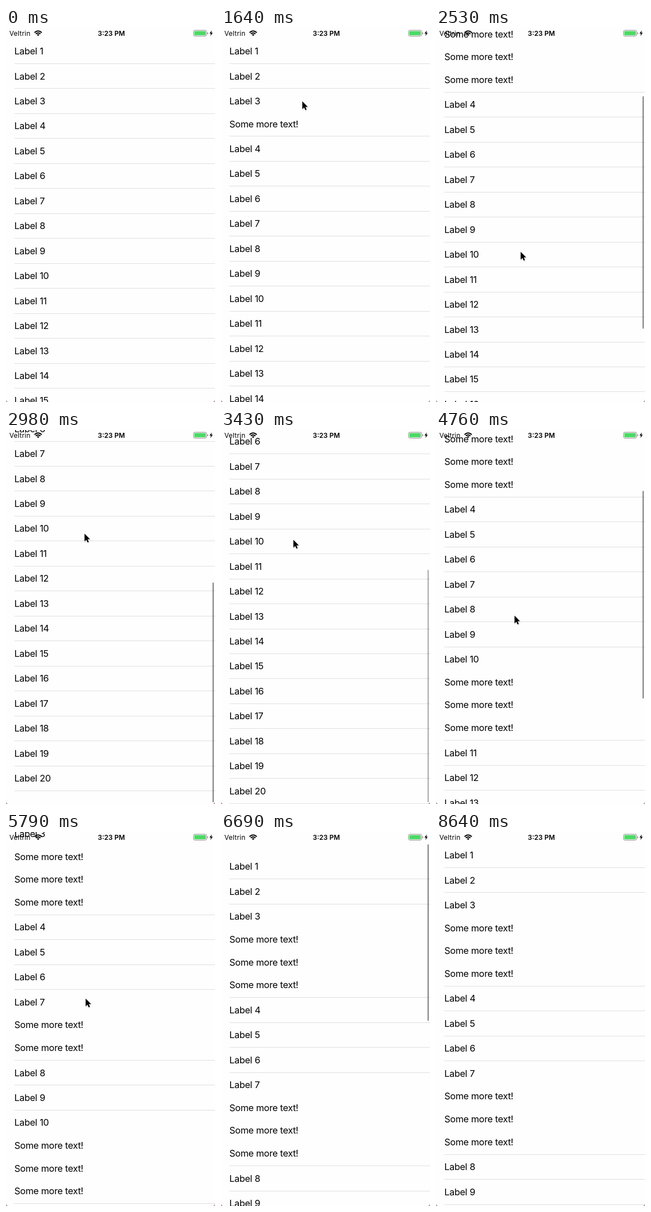
These frames come from a looping animation (374 px wide and 666 px high, 8.74 s). An HTML page:

```html
<!DOCTYPE html>
<html lang="en">
<head>
<meta charset="utf-8">
<title>Expanding list</title>
<style>
  html, body { margin: 0; width: 100%; height: 100%; overflow: hidden; background: #fefefe; }
  svg { display: block; width: 374px; height: 666px; }
  text { font-family: Inter, "Liberation Sans", sans-serif; fill: #000; }
  #list text { font-size: 16.5px; letter-spacing: -0.3px; }
  #list rect { fill: #dfdfe1; }
  #status text { font-size: 12px; }
</style>
</head>
<body>
<svg viewBox="0 0 374 666">
  <rect width="374" height="666" fill="#fefefe"/>
  <g id="list"></g>
  <rect id="bar" x="369.5" width="2.5" rx="1.25" fill="#000" fill-opacity=".44"/>
  <g id="status">
    <text x="6" y="13.5" letter-spacing=".2">Veltrin</text>
    <g fill="none" stroke="#000" stroke-width="2">
      <path d="M51 8.2Q57.5 2.2 64 8.2"/>
      <path d="M53.3 10.6Q57.5 6.8 61.7 10.6"/>
    </g>
    <path d="M57.5 14.2L55.2 11.9Q57.5 10 59.8 11.9Z"/>
    <text x="188.5" y="13.5" text-anchor="middle" font-weight="600">3:23 PM</text>
    <rect x="335.5" y="4" width="23.5" height="10.5" rx="2.6" fill="#fff" stroke="#8c8c8c"/>
    <rect x="337" y="5.5" width="20.5" height="7.5" rx="1.3" fill="#4cd964"/>
    <path d="M360.2 7.4Q361.8 7.8 361.8 9.3T360.2 11.2Z" fill="#8c8c8c"/>
    <path d="M368.3 4.3L364.2 9.8H366.7L365.8 14.2L370 8.5H367.4Z"/>
  </g>
  <path d="M0 661.5Q.5 665.5 4.5 666H0ZM374 661.5Q373.5 665.5 369.5 666H374Z" fill="#b58f98"/>
  <g id="cursor">
    <path d="M1 2V17L4.4 13.8L6.4 18.2L9.2 17L7.2 12.6H11.6Z" fill="#000" opacity=".13"/>
    <path d="M.5 .5V14.6L3.8 11.5L5.9 16.3L8.2 15.3L6.1 10.6H10.4Z"
          stroke="#fff" stroke-width="1.1" stroke-linejoin="round" paint-order="stroke"/>
  </g>
</svg>
<script>
const LOOP = 8740, START = 750, STEP = 148.1;
const ROWS = 20, ROW = 44.46, EXTRA = 40.6;

// Steps at which a row gains one more line of text
const taps = { 3: [6, 7, 8], 7: [32, 34, 35], 10: [21, 23, 24] };

// [step, value...]
const scrollPath = [
  [10, 0], [11, 60], [12, 160], [13, 270], [14, 350], [15, 387.75], [16, 376], [17, 368], [18, 365],
  [24, 365], [25, 325], [26, 230], [27, 155], [28, 131], [29, 127],
  [35, 127], [36, 110], [37, 62], [38, 10], [39, -14], [40, -20.4], [41, -9], [42, -3], [43, 0]
];
const cursorPath = [
  [0, 272, 220], [4, 145, 130], [8, 145, 130], [10, 158, 540], [15, 140, 184], [20, 121, 202],
  [24, 121, 202], [27, 140, 330], [30, 142, 296], [35, 142, 296], [38, 180, 560], [39, 215, 680]
];
const barPath = [
  [10, 0], [11, 1], [17, 1], [20, 0], [24, 0], [25, 1], [28, 1], [30, 0],
  [35, 0], [36, 1], [42, 1], [45, 0]
];

const $ = id => document.getElementById(id);
const list = $('list'), bar = $('bar'), cursor = $('cursor');

function add(tag, attrs, label = '') {
  const el = document.createElementNS('http://www.w3.org/2000/svg', tag);
  for (const key in attrs) el.setAttribute(key, attrs[key]);
  el.textContent = label;
  return list.appendChild(el);
}

const rows = Array.from({ length: ROWS }, (_, i) => ({
  taps: taps[i + 1] || [],
  label: add('text', { x: 15 }, 'Label ' + (i + 1)),
  more: (taps[i + 1] || []).map(() => add('text', { x: 15 }, 'Some more text!')),
  line: add('rect', { x: 15, width: 359, height: 1 })
}));

function along(path, k) {
  const i = path.findIndex(p => p[0] > k);
  if (i === 0) return path[0].slice(1);
  if (i < 0) return path[path.length - 1].slice(1);
  const a = path[i - 1], b = path[i], u = (k - a[0]) / (b[0] - a[0]);
  return a.slice(1).map((v, j) => v + (b[j + 1] - v) * u);
}

function drawBar(k, scroll, height) {
  const max = height - 666, full = 641 * 666 / height;
  const over = Math.max(0, -scroll, scroll - max);
  const size = full - over;
  const part = Math.min(1, Math.max(0, scroll / max));
  bar.setAttribute('y', 22 + (641 - size) * part);
  bar.setAttribute('height', size);
  bar.setAttribute('opacity', along(barPath, k)[0]);
}

function draw(k) {
  const [scroll] = along(scrollPath, k);
  let top = 63 - ROW;
  for (const row of rows) {
    const count = row.taps.filter(s => s <= k).length;
    const base = top - scroll + 28.5;
    row.label.setAttribute('y', base);
    row.more.forEach((el, i) => {
      el.setAttribute('y', base + EXTRA * (i + 1));
      el.setAttribute('visibility', i < count ? 'visible' : 'hidden');
    });
    top += ROW + (count && 40.73 * count - 0.2);
    row.line.setAttribute('y', Math.round(top - scroll));
  }
  drawBar(k, scroll, top + 1.5);
  const [x, y] = along(cursorPath, k);
  cursor.setAttribute('transform', `translate(${Math.round(x)} ${Math.round(y)})`);
  cursor.setAttribute('visibility', k >= 0 && k < 39 ? 'visible' : 'hidden');
}

const began = performance.now();
function tick() {
  const t = (performance.now() - began) % LOOP;
  draw(Math.floor((t - START) / STEP));
  requestAnimationFrame(tick);
}
tick();
</script>
</body>
</html>
```
